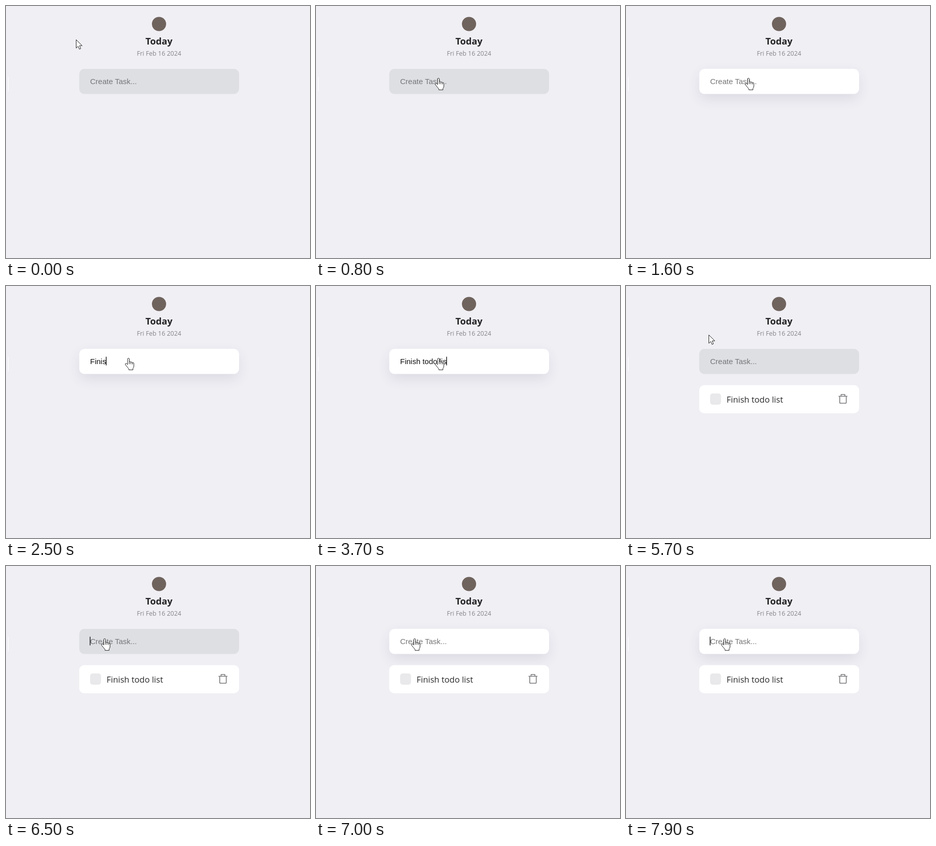
Animation of 600 by 497 pixels, one loop 8 s. Source, as an HTML page:

```html
<!DOCTYPE html>
<html lang="en">
<head>
<meta charset="utf-8">
<title>Today</title>
<style>
  html, body { margin: 0; width: 100%; height: 100%; overflow: hidden; background: #f0eff4; }
  svg { display: block; width: 100vw; height: 100vh; }
  .ui { font-family: "Open Sans", "Noto Sans", sans-serif; }
  .field { font: 15px "Liberation Sans", Arial, sans-serif; }
</style>
</head>
<body>
<svg viewBox="0 0 600 497">
  <defs>
    <filter id="soft" x="-20%" y="-100%" width="140%" height="300%">
      <feGaussianBlur stdDeviation="13"/>
    </filter>
  </defs>
  <rect width="600" height="497" fill="#f0eff4"/>
  <path d="M4.5 140V168" stroke="#fff"/>

  <circle cx="302" cy="35.5" r="14" fill="#6f635d"/>
  <g class="ui" text-anchor="middle">
    <text x="302" y="75.5" font-size="18.2" font-weight="700" fill="#242426">Today</text>
    <text x="302" y="98" font-size="12.4" fill="#858588">Fri Feb 16 2024</text>
  </g>

  <rect id="shadow" x="146" y="134" width="312" height="49" rx="10" fill="#32325d" filter="url(#soft)"/>
  <rect x="144.5" y="124" width="315.5" height="49.5" rx="10" fill="#dddfe3"/>
  <rect id="focus" x="144.5" y="124" width="315.5" height="49.5" rx="10" fill="#fff"/>
  <text id="hint" class="field" x="166" y="153.5" fill="#757577">Create Task...</text>
  <text id="typed" class="field" x="166" y="153.5" fill="#111"></text>
  <path id="caret" d="M.5 139.5V156.5" stroke="#000" stroke-width="1.3"/>

  <g id="task">
    <rect x="144.5" y="195.5" width="315.5" height="55.5" rx="10" fill="#fff"/>
    <rect x="166" y="212" width="21.5" height="22" rx="5" fill="#e9e8ea"/>
    <text class="ui" x="198.5" y="229.5" font-size="16.5" fill="#28282b">Finish todo list</text>
    <g fill="none" stroke="#7b7b7e" stroke-width="1.6" stroke-linejoin="round" stroke-linecap="round">
      <path d="M420 217.5H436.5M424.5 217V214H432V217"/>
      <path d="M421.8 218V229.5Q421.8 231.3 423.6 231.3H432.9Q434.7 231.3 434.7 229.5V218"/>
    </g>
  </g>

  <g id="pointer" fill="#fff" stroke="#222" stroke-linejoin="round">
    <path id="arrow" d="M.5 .5V17L4.3 13.4 6.9 19.2 9.6 18 7.1 12.2H12.3Z"/>
    <g id="hand">
      <path d="M-1 13V1.8Q-1 .4 .7 .4T2.4 1.8V7.6Q4 6.2 5.4 8.2 7.2 7 8.5 9.1 11.3 8.2 11.3 11V16Q11.3 18.5 9.5 20.5V23.4H1.4V21.5Q-1.5 18-5.4 13.2-6.2 11-4 10.6-2.5 10.8-1 13Z"/>
      <path d="M2.4 7.6V12M5.4 8.2V12.2M8.5 9.1V12.5" fill="none"/>
    </g>
  </g>
</svg>
<script>
const LOOP = 8000, STEP = 100;
const TASK = "Finish todo list";
const TYPE_START = 2000, TYPE_GAP = 120, SUBMIT = 4600;
const CLICKS = [1000, 6480];

// Pointer hot spot: [time, x, y]
const PATH = [
  [0, 138, 66], [100, 138, 66], [750, 241, 142], [4900, 241, 142],
  [5500, 163, 96], [5800, 163, 96], [6300, 194, 143], [LOOP, 194, 143]
];

const el = id => document.getElementById(id);
const show = (id, on) => el(id).setAttribute("visibility", on ? "visible" : "hidden");
const ease = p => p * p * (3 - 2 * p);
const ramp = (t, start, length) => ease(Math.min(1, Math.max(0, (t - start) / length)));

function pointerAt(t) {
  const i = PATH.findIndex((key, n) => n > 0 && t <= key[0]);
  const [t0, x0, y0] = PATH[i - 1], [t1, x1, y1] = PATH[i];
  const p = ramp(t, t0, t1 - t0);
  return [x0 + (x1 - x0) * p, y0 + (y1 - y0) * p];
}

function drawPointer(t) {
  const [x, y] = pointerAt(t);
  const over = x > 144 && x < 460 && y > 124 && y < 173;
  el("pointer").setAttribute("transform", `translate(${x} ${y})`);
  show("arrow", !over);
  show("hand", over);
}

function drawField(t) {
  const focus = ramp(t, CLICKS[0], 400) - ramp(t, SUBMIT + 60, 450) + ramp(t, CLICKS[1], 400);
  el("focus").setAttribute("opacity", focus);
  el("shadow").setAttribute("opacity", focus * 0.11);

  const count = t < TYPE_START || t >= SUBMIT ? 0
    : Math.min(TASK.length, Math.floor((t - TYPE_START) / TYPE_GAP) + 1);
  const typed = el("typed");
  typed.textContent = TASK.slice(0, count);
  show("hint", count === 0);

  const lastKey = TYPE_START + (TASK.length - 1) * TYPE_GAP;
  const active = (t >= CLICKS[0] && t < SUBMIT) || t >= CLICKS[1];
  const since = t >= CLICKS[1] ? t - CLICKS[1]
    : t >= lastKey ? t - lastKey
    : count ? 0 : t - CLICKS[0];
  show("caret", active && since % 1000 < 500);
  const end = 165.5 + (count ? typed.getComputedTextLength() : 0);
  el("caret").setAttribute("transform", `translate(${end} 0)`);
}

function drawTask(t) {
  const p = ramp(t, SUBMIT, 380);
  el("task").setAttribute("opacity", p);
  el("task").setAttribute("transform", `translate(0 ${-21 * (1 - p)})`);
}

function render(now) {
  const t = Math.floor((now % LOOP) / STEP) * STEP;
  drawField(t);
  drawTask(t);
  drawPointer(t);
}

const start = performance.now();
function tick() {
  render(performance.now() - start);
  requestAnimationFrame(tick);
}
tick();
</script>
</body>
</html>
```
